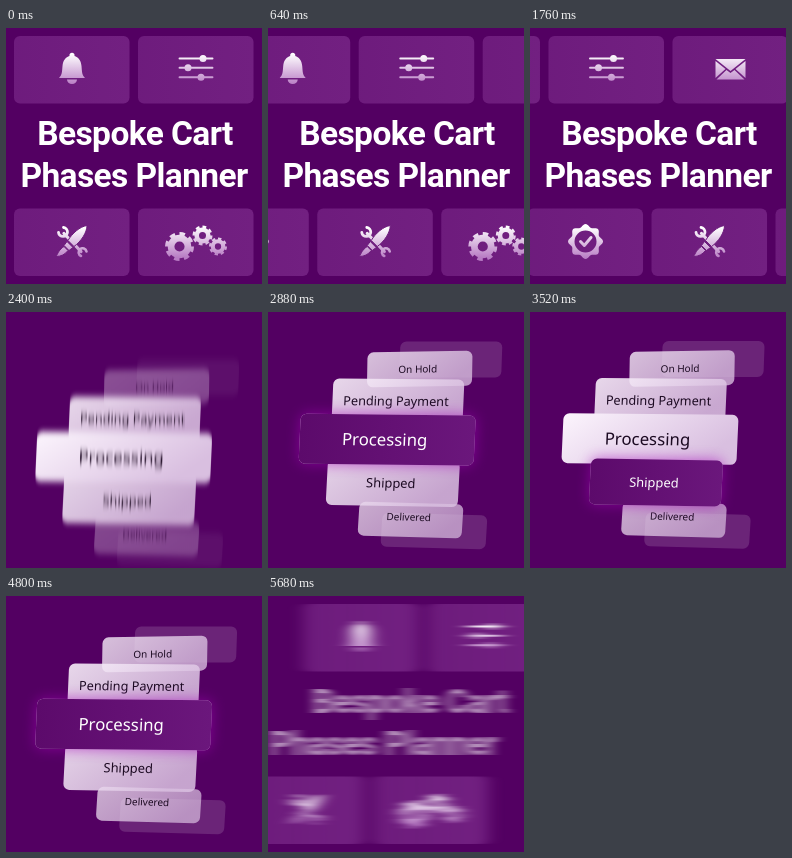
These frames come from a looping animation (256 by 256 pixels, 5760 ms). An HTML page:

```html
<!DOCTYPE html>
<html lang="en">
<head>
<meta charset="utf-8">
<title>Bespoke Cart Phases Planner</title>
<style>
  html, body { margin: 0; width: 100%; height: 100%; overflow: hidden; background: #530062; }
  svg { display: block; width: 100vw; height: 100vh; }
  .title { font: 700 33.5px Roboto, sans-serif; letter-spacing: -.6px; fill: #fff; text-anchor: middle; }
  .label { font-family: "Noto Sans", "Open Sans", sans-serif; font-weight: 500; text-anchor: middle; }
</style>
</head>
<body>
<svg id="stage" viewBox="0 0 256 256">
  <defs>
    <linearGradient id="tile">
      <stop offset="0" stop-color="#be6ecd" stop-opacity=".25"/>
      <stop offset="1" stop-color="#be6ecd" stop-opacity=".29"/>
    </linearGradient>
    <linearGradient id="icon" gradientUnits="userSpaceOnUse" x1="0" y1="-14" x2="0" y2="17">
      <stop offset="0" stop-color="#fff"/>
      <stop offset="1" stop-color="#b87cc4"/>
    </linearGradient>
    <linearGradient id="paper" x2="1" y2=".4">
      <stop offset="0" stop-color="#fcf5fd"/>
      <stop offset="1" stop-color="#d9bfe0"/>
    </linearGradient>
    <linearGradient id="dark">
      <stop offset="0" stop-color="#5c0a6b"/>
      <stop offset="1" stop-color="#6b177c"/>
    </linearGradient>
    <filter id="glow" x="-30%" y="-70%" width="160%" height="240%">
      <feGaussianBlur stdDeviation="7"/>
    </filter>
  </defs>
  <g id="menu">
    <g data-blur="tiles"><g id="top"></g></g>
    <g data-blur="tiles"><g id="bottom"></g></g>
    <g id="words" data-blur="text">
      <text id="line1" class="title" x="129" y="117">Bespoke Cart</text>
      <text id="line2" class="title" x="128" y="159">Phases Planner</text>
    </g>
  </g>
  <g id="list" data-blur="cards"></g>
</svg>
<script>
const LOOP = 5760, STEP = 80, SPEED = 0.0645, PITCH = 124;
const $ = id => document.getElementById(id);
const clamp = v => Math.min(1, Math.max(0, v));
const move = (el, x, y, rest = '') => el.setAttribute('transform', `translate(${x.toFixed(2)} ${y.toFixed(2)}) ${rest}`);

// Icons, each centred on 0,0
const line = (d, w) => `<path d="${d}" fill="none" stroke="url(#icon)" stroke-width="${w}" stroke-linecap="round" stroke-linejoin="round"/>`;
const dot = (x, y, r) => `<circle cx="${x}" cy="${y}" r="${r}" fill="url(#icon)"/>`;
const fill = d => `<path d="${d}" fill="url(#icon)" fill-rule="evenodd"/>`;
const gear = (x, y, r) => {
  const ring = (rad, w, extra = '') =>
    `<circle cx="${x}" cy="${y}" r="${rad}" fill="none" stroke="url(#icon)" stroke-width="${w}" ${extra}/>`;
  return ring(r * .58, r * .46) + ring(r * .88, r * .24, 'pathLength="16" stroke-dasharray="1.1 .9"');
};
const scallop = () => {
  const pts = [];
  for (let i = 0; i < 96; i++) {
    const a = i / 96 * 2 * Math.PI, r = 16 + 1.5 * Math.cos(8 * a);
    pts.push((r * Math.cos(a)).toFixed(1) + ' ' + (r * Math.sin(a)).toFixed(1));
  }
  return 'M' + pts.join('L') + 'Z';
};
const icons = {
  bell: fill('M-13 10C-10 7-10 4-9.500-2C-9-8-6-11-2.500-12A2.600 2.600 0 1 1 2.500-12C6-11 9-8 9.500-2C10 4 10 7 13 10Z') +
        fill('M-5 11.500H5A5 4.500 0 0 1-5 11.500Z'),
  sliders: [[-9.5, 7], [-.3, -8], [9.3, 5]].map(([y, x]) => line(`M-16.500 ${y}H16.500`, 1.9) + dot(x, y, 3.5)).join(''),
  mail: fill('M-15-9H15L0 3Z') + fill('M-15-7L-5 1L-15 10Z') + fill('M15-7L5 1L15 10Z') +
        fill('M-14 11.500L-4 2L0 5L4 2L14 11.500Z'),
  badge: `<g transform="translate(0 1)">${fill(scallop() + 'M-11 0A11 11 0 1 0 11 0A11 11 0 1 0-11 0Z')}` +
         `${line('M-5 0L-1.200 4L5.500-4', 3)}</g>`,
  tools: `<g transform="translate(0 1)">${line('M-8-8L9 10', 3.2)}${line('M-13.500-9A4.500 4.500 0 1 0-8.500-14', 2.8)}` +
         `${line('M9 14.500A4 4 0 1 1 14.500 10', 2.6)}` +
         `<g stroke="#6d1c7c" stroke-width="1">${fill('M15-16C15-9 9 0 2 5L-4-1C0-8 8-15 15-16Z')}` +
         `${fill('M-5 0L1 6L-3 9L-8 4Z')}${fill('M-8 5L-4 9C-7 13-11 15-16 15C-14 12-13 8-8 5Z')}</g></g>`,
  gears: gear(-16.5, 6, 14.5) + gear(6.5, -5, 10) + gear(22, 6, 9)
};

const tile = (name, x, y) => `<rect x="${x}" y="${y}" width="115.500" height="67.500" rx="6" fill="url(#tile)"/>
  <g transform="translate(${x + 58} ${y + 32})">${icons[name]}</g>`;
$('top').innerHTML = ['bell', 'sliders', 'mail', 'badge'].map((n, i) => tile(n, 8 + i * PITCH, 8)).join('');
$('bottom').innerHTML = ['gears', 'tools', 'badge', 'mail'].map((n, i) => tile(n, 132 - i * PITCH, 180.5)).join('');

// Status cards from back to front
const cards = [
  { x: 183, y: 47, w: 102, h: 36, tilt: 0, alpha: .14, outer: true },
  { x: 167.500, y: 218.500, w: 105, h: 34, tilt: 1.5, alpha: .14, outer: true },
  { text: 'On Hold', x: 152, y: 56.5, w: 105, h: 35, size: 10, tilt: -1, alpha: .78, outer: true, dx: -2 },
  { text: 'Delivered', x: 144, y: 207.500, w: 104, h: 34, size: 10, tilt: 1.6, alpha: .7, outer: true, dx: -2, dy: -3 },
  { text: 'Pending Payment', x: 130.500, y: 88.500, w: 131, h: 44, size: 12.7, tilt: .5, alpha: .88, dx: -2 },
  { text: 'Shipped', x: 126, y: 170.500, w: 132, h: 46, size: 12.9, tilt: 1, alpha: .86, dx: -2 },
  { text: 'Processing', x: 120, y: 127, w: 175, h: 50, size: 16.8, tilt: .6, alpha: 1, dx: -2.5 },
];
const box = (c, attrs) => `<rect x="${-c.w / 2}" y="${-c.h / 2}" width="${c.w}" height="${c.h}" rx="6" ${attrs}/>`;
const label = (c, color) => c.text
  ? `<text class="label" x="${c.dx}" y="${(c.dy || 0) + c.size * .36}" font-size="${c.size}" fill="${color}">${c.text}</text>` : '';
const addCard = (c, html) => {
  const g = document.createElementNS('http://www.w3.org/2000/svg', 'g');
  g.innerHTML = html;
  $('list').append(g);
  return { ...c, g };
};
const plain = cards.map(c => addCard(c,
  box(c, `fill="${c.text ? 'url(#paper)' : '#fff'}" fill-opacity="${c.alpha}"`) + label(c, '#1c0a22')));
const hot = [6, 5].map(i => addCard(cards[i],
  box(cards[i], 'fill="#a30cb8" opacity=".6" filter="url(#glow)"') +
  box(cards[i], 'fill="url(#dark)"') + label(cards[i], '#fff')));

// Directional motion blur
const blurs = {};
for (const name of ['tiles', 'text', 'cards']) {
  document.querySelector('defs').insertAdjacentHTML('beforeend',
    `<filter id="${name}" filterUnits="userSpaceOnUse" x="-60" y="-60" width="376" height="376"
      color-interpolation-filters="sRGB"><feGaussianBlur stdDeviation="0"/></filter>`);
  blurs[name] = {
    node: $(name).firstElementChild,
    users: document.querySelectorAll(`[data-blur=${name}]`)
  };
}
function setBlur(name, velocity, vertical) {
  const s = Math.min(16, Math.abs(velocity) * STEP * .155).toFixed(2), { node, users } = blurs[name];
  node.setAttribute('stdDeviation', vertical ? `0 ${s}` : `${s} 0`);
  users.forEach(u => s > .3 ? u.setAttribute('filter', `url(#${name})`) : u.removeAttribute('filter'));
}

// Offsets from rest: ease-in on the way out, ease-out on the way in
const leave = (t, start, span, dist, p) => dist * clamp((t - start) / span) ** p;
const enter = (t, end, span, dist, p) => dist * clamp((end - t) / span) ** p;
const slope = (f, t) => (f(t + 1) - f(t - 1)) / 2;

const tilesAt = t => t < 4000 ? -leave(t, 1960, 280, 400, 3) : enter(t, LOOP, 260, 294, 2.2);
const wordsAt = t => t < 4000 ? -leave(t, 1960, 280, 300, 3) : enter(t, LOOP, 260, 313, 2.7);
const listAt = t => t < 4000 ? enter(t, 2600, 500, 265, 3) : -leave(t, 5160, 320, 270, 3);

function drawMenu(t) {
  const scroll = -SPEED * (t < 4000 ? t : t - LOOP);
  const x = tilesAt(t) + scroll, w = wordsAt(t);
  move($('top'), x, 0);
  move($('bottom'), -x, 0);
  move($('line1'), w, 0);
  move($('line2'), -w, 0);
  $('words').setAttribute('opacity', 1 - .4 * clamp(Math.abs(w) / 13));
  setBlur('tiles', slope(tilesAt, t));
  setBlur('text', slope(wordsAt, t));
}

function drawList(t) {
  const s = (t - 3600) / 1200, y = listAt(t);
  const place = c => move(c.g, c.x - 2.3 * s * s + s * (c.y - 127) / 75, c.y + 1.5 * s * s + y, `rotate(${c.tilt}) skewX(-2)`);
  plain.forEach(c => {
    place(c);
    if (c.outer) c.g.setAttribute('opacity', clamp((t - 2240) / 380));
  });
  hot.forEach(place);
  const first = t < 3700 ? clamp((t - 2640) / 160) * clamp((3360 - t) / 160) : clamp((t - 4080) / 160);
  const second = clamp((t - 3200) / 160) * clamp((4240 - t) / 160);
  hot[0].g.setAttribute('opacity', first);
  hot[1].g.setAttribute('opacity', second);
  setBlur('cards', slope(listAt, t), true);
}

const began = performance.now();
function tick() {
  const t = Math.floor((performance.now() - began) % LOOP / STEP) * STEP;
  const menu = t < 2240 || t > 5500, list = t > 2100 && t < 5480;
  $('menu').style.display = menu ? '' : 'none';
  $('list').style.display = list ? '' : 'none';
  if (menu) drawMenu(t);
  if (list) drawList(t);
  requestAnimationFrame(tick);
}
tick();
</script>
</body>
</html>
```
